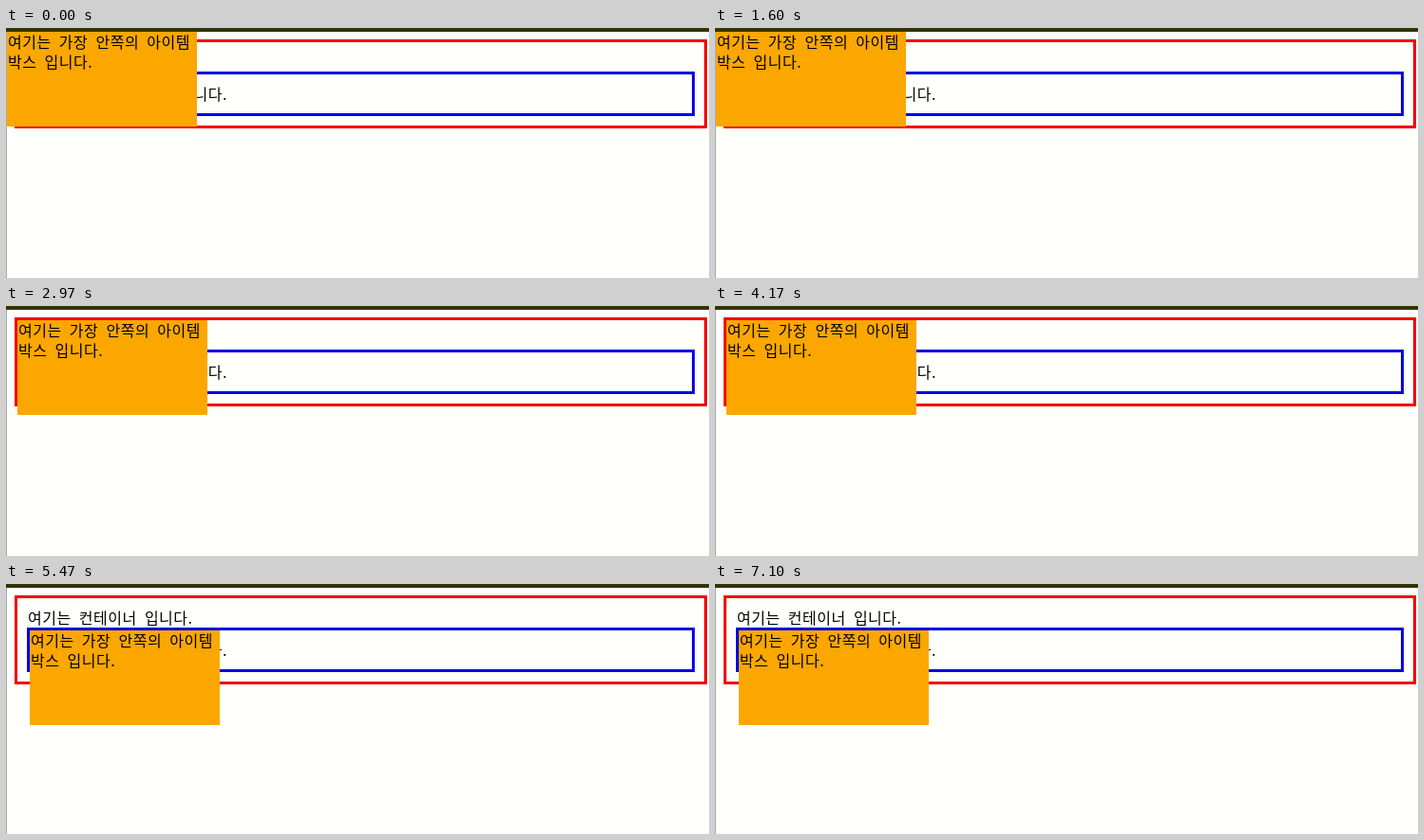
An HTML page for the animation above (7.13 s loop, 740x264 px).

```html
<!DOCTYPE html>
<html lang="ko">
<head>
<meta charset="utf-8">
<style>
  html, body { margin: 0; width: 100%; height: 100%; overflow: hidden; background: #fffffc; }
  svg { display: block; }
  text {
    font: 300 16px "Noto Sans CJK KR", "Noto Sans CJK", "Noto Sans CJK JP", sans-serif;
    letter-spacing: .5px;
    word-spacing: 3.2px;
    fill: #000;
  }
  .frame { fill: none; stroke-width: 3; }
</style>
</head>
<body>
<svg width="740" height="264" shape-rendering="crispEdges">
  <rect y="4" width="1" height="260" fill="#aaa"/>
  <rect width="740" height="4" fill="#333300"/>
  <rect class="frame" x="10.5" y="13.5" width="726" height="91" stroke="#f40000"/>
  <text x="23" y="42">여기는 컨테이너 입니다.</text>
  <rect class="frame" x="23.5" y="47.5" width="700" height="44" stroke="#0000e0"/>
  <text x="36" y="76">여기는 아이템 박스 입니다.</text>
  <g id="item">
    <rect width="200" height="100" fill="#fba700"/>
    <text x="1" y="17">여기는 가장 안쪽의 아이템</text>
    <text x="1" y="38">박스 입니다.</text>
  </g>
</svg>
<script>
  const LOOP = 7130;
  // Start time and top-left corner of each position
  const stops = [[0, 1, 4], [1670, 12, 15], [4200, 25, 49]];
  const item = document.getElementById("item");

  function draw() {
    const t = performance.now() % LOOP;
    const [, x, y] = stops.findLast(([start]) => t >= start);
    item.setAttribute("transform", `translate(${x} ${y})`);
    requestAnimationFrame(draw);
  }
  draw();
</script>
</body>
</html>
```
